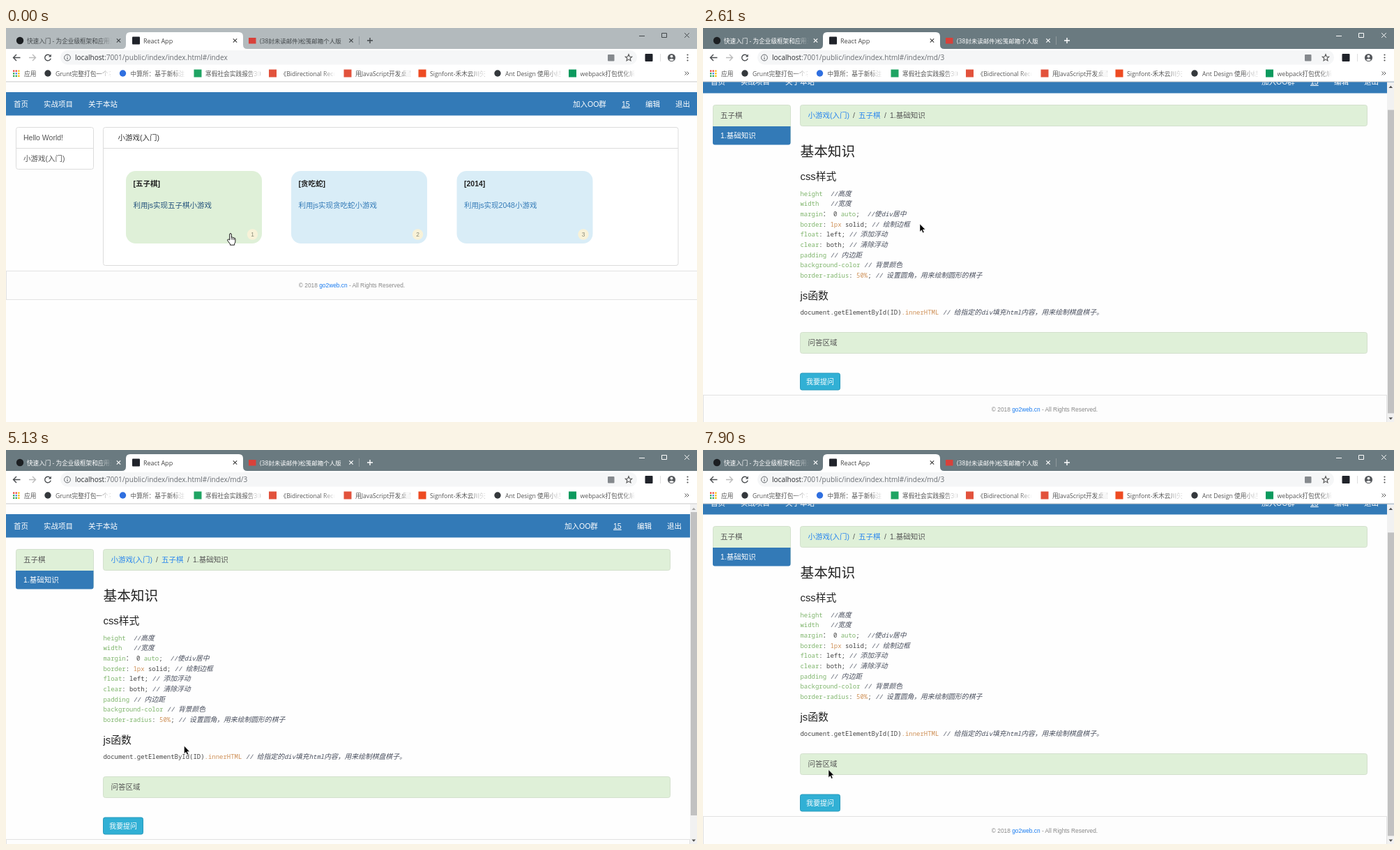
Recreate the animation shown at these times as an HTML page. Size 991 by 565 pixels, loop 8 s.

```html
<!DOCTYPE html>
<html lang="zh-CN">
<head>
<meta charset="utf-8">
<title>React App</title>
<style>
html, body { margin: 0; width: 100%; height: 100%; overflow: hidden; background: #fff; }
#stage { display: block; width: 991px; height: 565px; --bar: #b3babd; --tab: #43484b; }
text { white-space: pre; font-family: "Liberation Sans", "Noto Sans CJK SC", sans-serif; }
.ui { font-family: "Open Sans", "Noto Sans CJK SC", sans-serif; }
.code { font-family: "Noto Sans Mono", "Noto Sans CJK SC", monospace; }
</style>
</head>
<body>
<svg id="stage" viewBox="0 0 991 565" xmlns="http://www.w3.org/2000/svg"></svg>
<script>
const LOOP = 8000;
const BLUE = '#337ab7', GREEN = '#dff0d8', SKY = '#d9edf7', EDGE = '#dcdcdc', LINK = '#2a86ee';
const URL_HOST = 'localhost', URL_HOME = ':7001/public/index/index.html#/index', URL_MD = URL_HOME + '/md/3';

// Text is placed by its left edge and vertical centre.
const text = (x, cy, str, size = 10.5, fill = '#555', more = '') =>
  `<text x="${x}" y="${(cy + size * 0.37).toFixed(2)}" font-size="${size}" fill="${fill}" ${more}>${str}</text>`;
const ui = (x, cy, str, size, fill, more = '') => text(x, cy, str, size, fill, `class="ui" ${more}`);
const rect = (x, y, w, h, fill, r = 0, more = '') =>
  `<rect x="${x}" y="${y}" width="${w}" height="${h}" fill="${fill}" rx="${r}" ${more}/>`;
const box = (x, y, w, h, fill, r = 3, edge = EDGE) => rect(x, y, w, h, fill, r, `stroke="${edge}"`);
const circle = (x, y, r, fill, more = '') => `<circle cx="${x}" cy="${y}" r="${r}" fill="${fill}" ${more}/>`;
const line = (d, color, width = 1) => `<path d="${d}" fill="none" stroke="${color}" stroke-width="${width}"/>`;
const group = (id, body) => `<g id="${id}">${body}</g>`;
const cross = (x, y, r, color, width = 1.2) =>
  line(`M${x - r} ${y - r}l${2 * r} ${2 * r}m0 ${-2 * r}l${-2 * r} ${2 * r}`, color, width);

// A label cut at a fixed width with a soft right end.
const faded = (x, cy, w, str, size, fill, fade) =>
  `<svg x="${x}" y="${cy - 9}" width="${w}" height="18">${ui(0, 9, str, size, fill)}` +
  rect(w - 18, 0, 18, 18, `url(#${fade})`) + '</svg>';

const gradient = (id, color) =>
  `<linearGradient id="${id}"><stop offset="0" style="stop-color:${color};stop-opacity:0"/>` +
  `<stop offset="1" style="stop-color:${color}"/></linearGradient>`;

function nav(shift) {
  return rect(0, 92, 991, 33.5, BLUE) +
    [[11, '首页'], [54, '实战项目'], [118, '关于本站'], [813 - shift, '加入OO群'], [917 - shift, '编辑'], [960 - shift, '退出']]
      .map(([x, s]) => text(x, 109, s, 10.5, '#fff')).join('') +
    text(883 - shift, 109, '15', 10.5, '#fff', 'text-decoration="underline"');
}

function footer(y, mid, right) {
  return box(0.5, y, right - 0.5, 41, '#fdfdfd', 0, '#e2e2e2') +
    text(mid, y + 20.5, `© 2018 <tspan fill="#1a7cf0">go2web.cn</tspan> - All Rights Reserved.`, 8.36, '#888', 'text-anchor="middle"');
}

function card(x, title, label, n) {
  const hot = n === 1;
  return rect(x, 205, 195, 104, hot ? GREEN : SKY, 14) +
    text(x + 10.5, 223, title, 10.5, '#222', 'font-weight="bold"') +
    text(x + 10.5, 254, label, 10.5, hot ? '#23527c' : BLUE) +
    circle(x + 181.5, 296, 7.7, '#f8f2d8') +
    text(x + 181.5, 296, n, 8.4, '#8a8a78', 'text-anchor="middle"');
}

function homePage() {
  return nav(0) +
    box(14.5, 142.5, 111, 60, '#fff') + line('M14 172.5H126', EDGE) +
    text(25, 157.5, 'Hello World!') + text(25, 187.5, '小游戏(入门)') +
    box(139.5, 142.5, 824.5, 198, '#fff') + line('M139 172.5H964', EDGE) +
    text(160.5, 157.5, '小游戏(入门)', 10.5, '#333') +
    card(172, '[五子棋]', '利用js实现五子棋小游戏', 1) +
    card(409, '[贪吃蛇]', '利用js实现贪吃蛇小游戏', 2) +
    card(646.5, '[2014]', '利用js实现2048小游戏', 3) +
    footer(348.5, 496, 992);
}

const INK = { k: '#7fb56c', n: '#cf9158', p: '#444', c: '#474d5c' };
// Each part is a one-letter ink followed by its text; "c" marks a comment.
function code(cy, ...parts) {
  const spans = parts.map(p => {
    const ink = p[0], body = p.slice(1).replace(/[\u3000-\uffef]+/g, m => `<tspan font-size="9.8">${m}</tspan>`);
    return `<tspan fill="${INK[ink]}"${ink === 'c' ? ' font-style="italic"' : ''}>${body}</tspan>`;
  });
  return text(139.5, cy, spans.join(''), 8.96, INK.p, 'class="code"');
}

function articlePage() {
  const css = [
    ['kheight  ', 'c//高度'],
    ['kwidth   ', 'c//宽度'],
    ['kmargin', 'p： 0 ', 'kauto', 'p;  ', 'c//使div居中'],
    ['kborder', 'p: ', 'n1px', 'p solid; ', 'c// 绘制边框'],
    ['kfloat', 'p: left; ', 'c// 添加浮动'],
    ['kclear', 'p: both; ', 'c// 清除浮动'],
    ['kpadding ', 'c// 内边距'],
    ['kbackground-color ', 'c// 背景颜色'],
    ['kborder-radius', 'p: ', 'n50%', 'p; ', 'c// 设置圆角，用来绘制圆形的棋子']
  ];
  return nav(12) +
    box(14.5, 142.5, 111, 56, GREEN, 3, '#d3e0cd') +
    `<path d="M14 173H125.5V196.5a3 3 0 0 1-3 3H17a3 3 0 0 1-3-3z" fill="${BLUE}"/>` +
    text(25, 157.5, '五子棋') + text(25, 186, '1.基础知识', 10.5, '#fff', 'font-weight="500"') +
    box(139.5, 142.5, 813, 30, GREEN, 3, '#d3e0cd') +
    text(150.5, 157.5, '小游戏(入门)', 10.5, LINK) + text(215, 157.5, '/') +
    text(223, 157.5, '五子棋', 10.5, LINK) + text(260, 157.5, '/') + text(268, 157.5, '1.基础知识') +
    text(139.5, 208.5, '基本知识', 19.7, '#222') +
    text(139.5, 244.5, 'css样式', 14.8, '#222') +
    css.map((parts, i) => code(269.5 + i * 14.64, ...parts)).join('') +
    text(139.5, 415.5, 'js函数', 14.8, '#222') +
    code(440, 'pdocument.getElementById(ID)', 'n.innerHTML ', 'c// 给指定的div填充html内容，用来绘制棋盘棋子。') +
    box(139.5, 468.5, 813, 30, GREEN, 3, '#d3e0cd') + text(150.5, 483.5, '问答区域') +
    box(139.5, 527, 57, 24, '#31b0d5', 2.5, '#269abc') +
    text(148, 539, '我要提问', 10, '#fff', 'font-weight="500"') +
    footer(558.5, 490, 980.5);
}

function star(x, y, r) {
  const pts = Array.from({ length: 10 }, (_, i) => {
    const a = i * Math.PI / 5, q = i % 2 ? r * 0.45 : r;
    return `${(x + q * Math.sin(a)).toFixed(2)} ${(y - q * Math.cos(a)).toFixed(2)}`;
  });
  return line(`M${pts.join('L')}z`, '#555', 1.1);
}

function tabStrip() {
  return rect(0, 0, 991, 31, 'var(--bar)') +
    `<path d="M166 30q6 0 6-6V12q0-6 6-6H334q6 0 6 6v12q0 6 6 6z" fill="#fff"/>` +
    circle(20, 18, 5.2, '#1c1f22') +
    faded(30, 18.5, 122, '快速入门 - 为企业级框架和应用开发', 8.6, 'var(--tab)', 'fadeBar') +
    cross(161.5, 18, 2.7, 'var(--tab)') +
    rect(181, 12.5, 11, 11, '#20232a', 1, 'id="favicon"') +
    group('spinner', line('M185 15.2l2-.6', '#888')) +
    ui(197, 18.5, 'React App', 9, '#444') + cross(328.5, 18, 2.7, '#444') +
    rect(348, 14, 10.5, 8.5, '#d8413a') +
    ui(364, 18.5, '(38封未读邮件)松笺邮箱个人版', 8.5, 'var(--tab)') + cross(495, 18, 2.7, 'var(--tab)') +
    line('M506.5 12V24', '#8f999d') + line('M518 18H526M522 14V22', 'var(--tab)', 1.4) +
    line('M908 11.5H916M940.5 7.5H947.5V13.5H940.5z', 'var(--tab)') + cross(976.5, 10.5, 3.3, 'var(--tab)', 1);
}

function toolbar() {
  return rect(0, 30, 991, 47, '#fff') + rect(78, 32, 827, 20.5, '#f5f6f7', 10) +
    line('M20.5 42.5H11M15 38L10.5 42.5L15 47', '#4a4d50', 1.4) +
    line('M33 42.5H42.5M38 38L42.5 42.5L38 47', '#bbb', 1.4) +
    circle(60, 42.5, 10, '#e6e8ea', 'id="hover"') +
    line('M63.2 39.6A4.3 4.3 0 1 0 64.2 43.6', '#4a4d50', 1.4) +
    '<path d="M64.8 37.6V41.6H60.8z" fill="#4a4d50"/>' +
    circle(88, 42.5, 4.4, 'none', 'stroke="#5f6368"') + line('M88 42V45M88 40V41', '#5f6368', 1.1) +
    `<text id="address" class="ui" x="99" y="46" font-size="10.07" fill="#6a6e73"></text>` +
    rect(863, 38, 9.5, 9.5, '#85898d', 1, 'id="translate"') + star(893, 42.8, 5) +
    rect(916.5, 37, 11, 11, '#20232a', 1, 'id="addon"') + line('M938.5 37V48', '#ddd') +
    circle(954.5, 42.5, 5.6, '#55585c') + circle(954.5, 40.7, 1.9, '#fff') +
    '<path d="M951 45.6q3.5-3.4 7 0q-3.5 3-7 0z" fill="#fff"/>' +
    [38.5, 42.5, 46.5].map(y => circle(977.5, y, 1.1, '#555')).join('');
}

function bookmarks() {
  const dots = ['#ea4335', '#ea4335', '#fbbc05', '#34a853', '#4285f4', '#fbbc05', '#34a853', '#34a853', '#fbbc05'];
  const items = [
    [60, 'Grunt完整打包一个项目', '#34383c', 1],
    [167.5, '中算所：基于新标注数据', '#2f6fe0', 1],
    [275, '寒假社会实践报告300字', '#1fa463'],
    [382.5, '《Bidirectional Recurrent', '#e2523c'],
    [490, '用JavaScript开发桌面', '#e2523c'],
    [597, 'Signfont-禾木云川矢量', '#ee4b22'],
    [705, 'Ant Design 使用小结', '#34383c', 1],
    [812.5, 'webpack打包优化解决', '#0b9a5e']
  ];
  return dots.map((c, i) => rect(10 + i % 3 * 3.6, 60.5 + Math.floor(i / 3) * 3.6, 2.3, 2.3, c)).join('') +
    ui(26, 65.5, '应用', 8.7, '#555') +
    items.map(([x, s, c, round]) =>
      (round ? circle(x, 65, 4.7, c) : rect(x - 5.5, 59.5, 11, 11, c)) +
      faded(x + 11, 65.5, 78.5, s, 8.7, '#555', 'fadeWhite')).join('') +
    line('M973.5 62.5l2.5 2.5l-2.5 2.5M976.5 62.5l2.5 2.5l-2.5 2.5', '#555') +
    line('M0 77H991', '#c9c9c9');
}

const scrollbar = rect(981, 77.5, 10, 488, '#f1f1f1') + rect(982, 89, 9, 435, '#c1c1c1', 0, 'id="thumb"') +
  '<path id="up" d="M983.5 86l2.8-3.2l2.8 3.2z"/><path d="M983.5 558.5h5.6l-2.8 3.2z" fill="#505050"/>';

const statusBar = rect(-1, 551.5, 330.5, 15, '#fcfcfc', 2, 'stroke="#d2d2d2"') +
  ui(2, 559.3, URL_HOST + URL_MD, 8.6, '#63676b');

const arrow = '<path d="M0 0V11.2L2.5 8.8L4.2 12.8L6.1 12L4.4 8.1H7.8z" fill="#000" stroke="#fff" stroke-width=".5"/>';
const hand = '<path d="M-1.3 9V1Q-1.3-.4 0-.4T1.3 1V5.2Q2.6 4.4 3.4 5.7Q4.7 5 5.3 6.2Q6.9 5.8 6.9 7.8V11Q6.9 13 5.6 14.2V16.2H-.6V14.8L-4 10.2Q-4.9 8.6-3.7 8.1Q-2.6 7.8-1.3 9z" fill="#fff" stroke="#000" stroke-width=".9"/>' +
  line('M1.3 5.2V8.6M3.4 5.8V8.8M5.3 6.4V9', '#000', 0.7);

const stage = document.getElementById('stage');
stage.innerHTML = `<defs>${gradient('fadeBar', 'var(--bar)')}${gradient('fadeWhite', '#fff')}</defs>` +
  rect(0, 0, 991, 565, '#fefefe') +
  group('home', homePage()) + group('article', articlePage()) + group('scrollbar', scrollbar) +
  tabStrip() + toolbar() + bookmarks() + group('status', statusBar) +
  group('cursor', group('arrow', arrow) + group('hand', hand));

const el = id => document.getElementById(id);
const show = (id, on) => el(id).setAttribute('visibility', on ? 'visible' : 'hidden');
const set = (id, name, value) => el(id).setAttribute(name, value);

// Progress 0..1 in n jumps, the first at time a and the last at time b.
function steps(t, a, b, n) {
  if (t < a) return 0;
  const k = b > a ? Math.floor((t - a) / (b - a) * (n - 1) + 1e-6) + 1 : n;
  return Math.min(n, k) / n;
}
const ease = p => p * p * (3 - 2 * p);

// start, end, jumps, x, y
const MOVES = [
  [120, 380, 3, 311, 281],
  [3040, 3850, 7, 279, 450],
  [4120, 4430, 3, 267, 447],
  [5130, 5936, 7, 60, 38],
  [6500, 7060, 5, 231, 283],
  [7360, 7765, 4, 184, 476],
  [7900, 7900, 1, 180, 458.5]
];
const SCROLL = [[0, 0], [2610, 32], [2760, 33], [4710, 17], [4860, 0], [7060, 2], [7210, 33]];

function pointer(t) {
  let x = 322, y = 295;
  for (const [a, b, n, tx, ty] of MOVES) {
    const p = ease(steps(t, a, b, n));
    x += (tx - x) * p;
    y += (ty - y) * p;
  }
  return [x, y];
}

function draw(t) {
  const opened = t >= 1510, loading = t >= 6070 && t < 6360;
  const scroll = SCROLL.filter(s => t >= s[0]).pop()[1];
  const [x, y] = pointer(t);

  stage.style.setProperty('--bar', opened ? '#6a7a80' : '#b3babd');
  stage.style.setProperty('--tab', opened ? '#fff' : '#43484b');
  show('home', !opened);
  show('article', opened);
  show('scrollbar', opened);
  set('article', 'transform', `translate(0 ${-scroll})`);
  set('thumb', 'y', 89 + scroll * 0.89);
  set('up', 'fill', scroll ? '#505050' : '#a3a3a3');
  el('address').innerHTML = `<tspan fill="#2b2e31">${URL_HOST}</tspan>${opened ? URL_MD : URL_HOME}`;

  show('favicon', !loading);
  show('spinner', loading);
  show('translate', !loading);
  set('addon', 'fill', loading ? '#e6e7e8' : '#20232a');
  show('hover', t >= 5930 && t < 6500);

  set('status', 'opacity', steps(t, 120, 380, 3) - steps(t, 1780, 2050, 3));
  set('cursor', 'transform', `translate(${x.toFixed(2)} ${y.toFixed(2)})`);
  show('arrow', opened);
  show('hand', !opened);
}

function tick() {
  draw(performance.now() % LOOP);
  requestAnimationFrame(tick);
}
tick();
</script>
</body>
</html>
```
